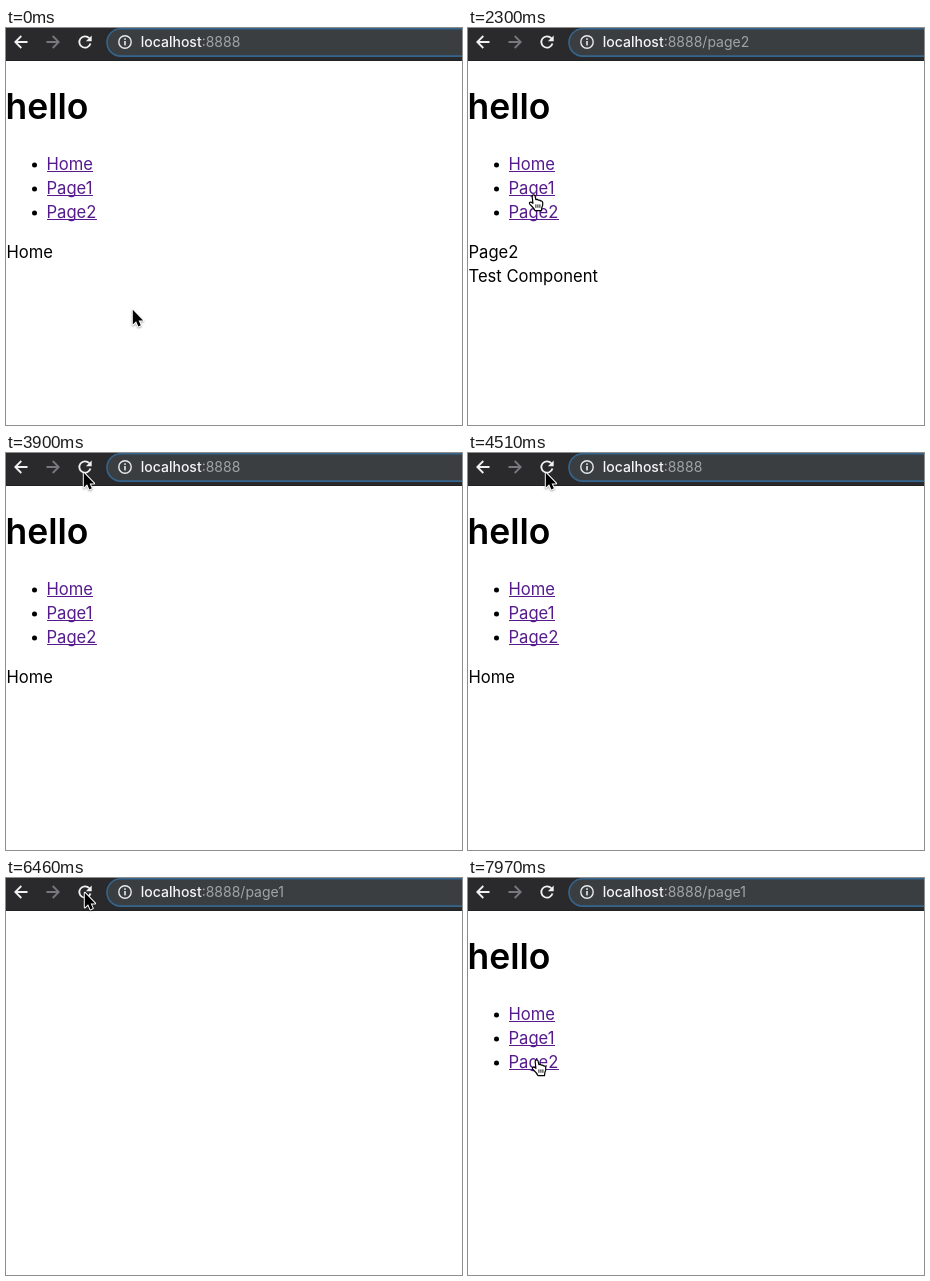
Recreate the animation shown at these times as an HTML page with a canvas. Size 456x397 px, loop 8 s.

```html
<!DOCTYPE html>
<html lang="en">
<head>
<meta charset="utf-8">
<title>Router demo</title>
<style>
html, body { margin: 0; width: 100%; height: 100%; overflow: hidden; background: #fff; }
canvas { display: block; }
</style>
</head>
<body>
<canvas id="stage" width="456" height="397"></canvas>
<script>
const ctx = document.getElementById('stage').getContext('2d');
const LOOP = 8000;
const TEXT = '16.6px Inter, sans-serif';
const TITLE = '600 35.5px Inter, sans-serif';
const LINKS = [['Home', 142], ['Page1', 166], ['Page2', 190]];

// [time, path, lines below the list]
const ROUTES = [
  [0, '', ['Home']],
  [1140, '/page1', ['Page1', 'Test Component']],
  [1850, '/page2', ['Page2', 'Test Component']],
  [2570, '/page1', ['Page1', 'Test Component']],
  [3190, '', ['Home']],
  [5580, '/page1', ['Page1', 'Test Component']],
  [7970, '/page1', []],
];

// [from, to, link held down]
const PRESSES = [
  [1050, 1140, 'Page1'], [1760, 1850, 'Page2'], [2480, 2570, 'Page1'],
  [3100, 3190, 'Home'], [5490, 5580, 'Page1'], [7800, 7970, 'Page2'],
];
const RELOADS = [[4340, 4510], [6460, 6640]];

// [first step, last step, steps, x, y]
const START = [126, 281];
const MOVES = [
  [180, 880, 9, 66, 165],
  [1310, 1580, 4, 67, 179],
  [1940, 1940, 1, 66, 179],
  [2210, 2300, 2, 65, 167],
  [2570, 2920, 5, 65, 135],
  [3460, 3900, 6, 77, 19],
  [4960, 5230, 4, 68, 168],
  [5580, 5580, 1, 68, 120],
  [5670, 5670, 1, 69, 70],
  [5760, 6110, 5, 78, 14],
  [6990, 6990, 1, 88, 82],
  [7080, 7080, 1, 90, 92],
  [7170, 7710, 7, 68, 182],
];

const ARROW = new Path2D('M0 0V14.6L3.3 11.5L5.6 16.6L8 15.5L5.8 10.6H10.3Z');
const HAND = new Path2D('M4.6 9.3L3.9 2.8Q3.8 .8 5.2 .8Q6.6 .8 6.9 2.4L7.6 5.6' +
  'Q9.4 4.8 10 6.2Q11.6 5.6 12.3 7Q14 6.6 14.4 8.4Q14.9 11 13.6 13.4L13.2 16.6H6.6' +
  'Q5.4 14 3 11.8Q.6 9.6 1.2 8.6Q2.4 7.6 4.6 9.3Z');
const KNUCKLES = new Path2D('M7.6 10.4V13.8M9.6 10.4V13.8M11.6 10.4V13.8');
const BACK = new Path2D('M6.5 0H-5.5M.3 -6L-5.7 0L.3 6');
const RELOAD = new Path2D('M4.3 -3.8A5.7 5.7 0 1 0 5.5 1.6');
const RELOAD_TIP = new Path2D('M6.7 -6.6V-.8H.9Z');

const within = ([from, to], t) => t >= from && t < to;
const mix = (a, b, k) => a + (b - a) * k;

function text(string, x, y, font, color) {
  ctx.font = font;
  ctx.fillStyle = color;
  ctx.fillText(string, x, y);
  return ctx.measureText(string).width;
}

function at(x, y, draw) {
  ctx.save();
  ctx.translate(x, y);
  draw();
  ctx.restore();
}

function stroke(path, color, width) {
  ctx.strokeStyle = color;
  ctx.lineWidth = width;
  ctx.stroke(path);
}

function fill(path, color) {
  ctx.fillStyle = color;
  ctx.fill(path);
}

function pointer(t) {
  let [x, y] = START;
  for (const [from, to, steps, endX, endY] of MOVES) {
    if (t < from) break;
    const step = to > from ? Math.floor((t - from) / (to - from) * (steps - 1) + 0.03) : 0;
    const k = Math.min(1, (step + 1) / steps);
    const eased = k * k * (3 - 2 * k);
    x = mix(x, endX, eased);
    y = mix(y, endY, eased);
  }
  return [Math.round(x), Math.round(y)];
}

function drawToolbar(path) {
  ctx.fillStyle = '#2a2a2c';
  ctx.fillRect(0, 0, 456, 33);
  ctx.fillStyle = '#202123';
  ctx.fillRect(0, 32, 456, 1);

  at(15, 14, () => stroke(BACK, '#f1f1f1', 1.8));
  at(47, 14, () => {
    ctx.scale(-1, 1);
    stroke(BACK, '#77797c', 1.8);
  });
  at(79, 14, () => {
    stroke(RELOAD, '#f1f1f1', 1.8);
    fill(RELOAD_TIP, '#f1f1f1');
  });

  const box = new Path2D();
  box.roundRect(101, 0.7, 400, 27.4, 13.7);
  fill(box, '#3b3e41');
  stroke(box, '#34658f', 1.6);

  const ring = new Path2D();
  ring.arc(119, 14, 6.2, 0, 7);
  stroke(ring, '#e8eaed', 1.4);
  ctx.fillStyle = '#e8eaed';
  ctx.fillRect(118.2, 13, 1.6, 4.4);
  ctx.fillRect(118.2, 10.3, 1.6, 1.6);

  const hostWidth = text('localhost', 134.8, 19, '500 14px Inter, sans-serif', '#f4f5f6');
  text(':8888' + path, 134.8 + hostWidth, 19, '14px Inter, sans-serif', '#a0a4a9');
}

function drawPage(lines, pressed) {
  text('hello', -0.5, 91, TITLE, '#000');
  for (const [label, y] of LINKS) {
    const dot = new Path2D();
    dot.arc(28.5, y - 5, 2.5, 0, 7);
    fill(dot, '#000');
    const color = label === pressed ? '#f00' : '#551a8b';
    const width = text(label, 40.5, y, TEXT, color);
    ctx.fillRect(41, y + 1, Math.round(width), 1);
  }
  lines.forEach((line, i) => text(line, 0.5, 230 + 24 * i, TEXT, '#000'));
}

function drawPointer(x, y) {
  const overLink = x > 40 && x < 92 && LINKS.some(([, base]) => y >= base - 14 && y <= base + 2);
  ctx.lineJoin = 'round';
  if (overLink) {
    at(x - 4.7, y - 1, () => {
      fill(HAND, '#fff');
      stroke(HAND, '#000', 1.2);
      stroke(KNUCKLES, '#000', 0.9);
    });
  } else {
    at(x + 0.8, y + 0.8, () => {
      ctx.shadowColor = 'rgba(0,0,0,.35)';
      ctx.shadowBlur = 2;
      ctx.shadowOffsetY = 1;
      stroke(ARROW, '#fff', 2);
      ctx.shadowColor = 'transparent';
      fill(ARROW, '#000');
    });
  }
  ctx.lineJoin = 'miter';
}

function render(t) {
  const [, path, lines] = ROUTES.findLast(([start]) => t >= start);
  const press = PRESSES.find(span => within(span, t));
  ctx.fillStyle = '#fff';
  ctx.fillRect(0, 0, 456, 397);
  drawToolbar(path);
  if (!RELOADS.some(span => within(span, t))) drawPage(lines, press && press[2]);
  drawPointer(...pointer(t));
}

function tick() {
  render(performance.now() % LOOP);
  requestAnimationFrame(tick);
}
tick();
</script>
</body>
</html>
```
